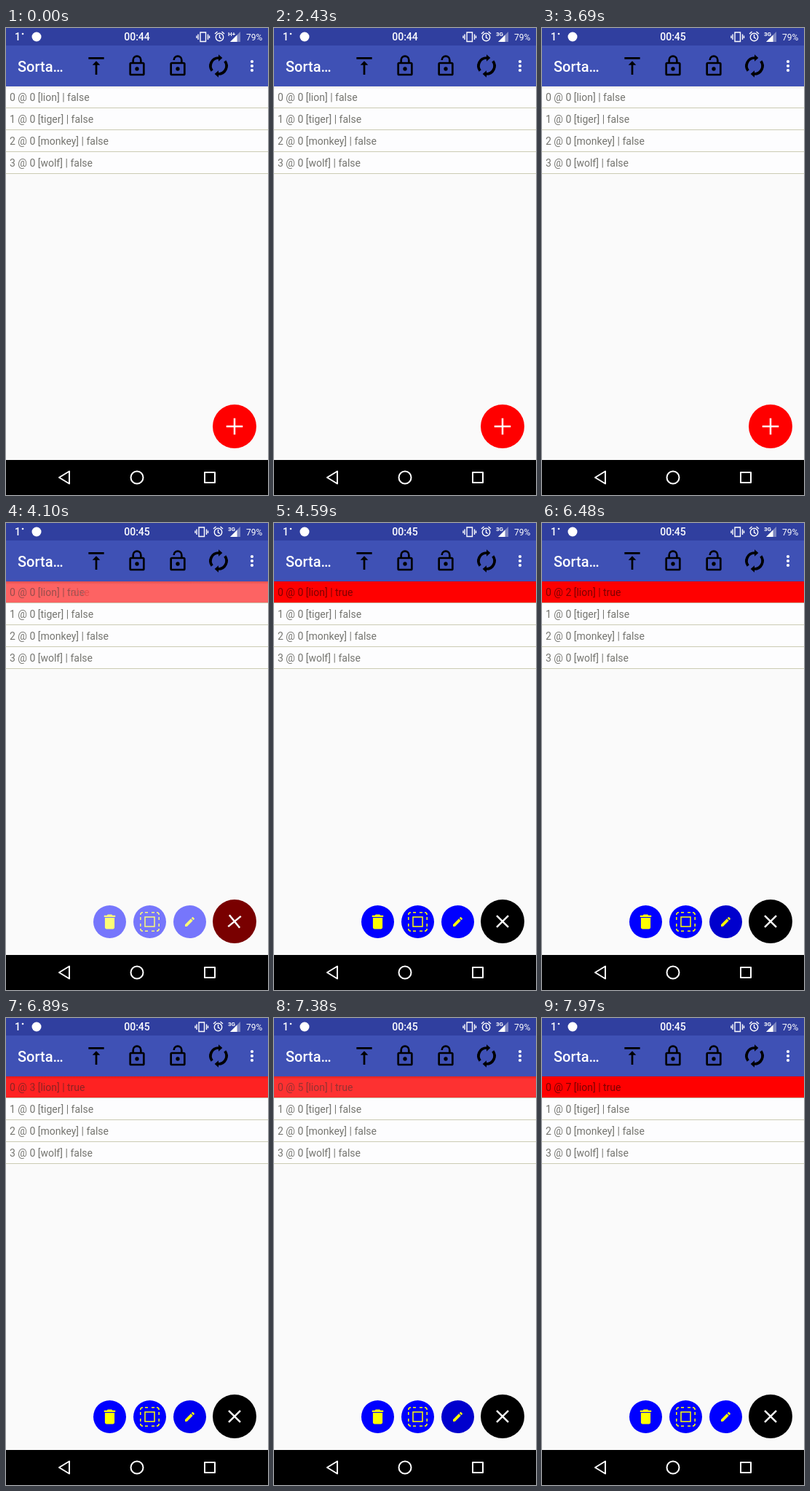
Recreate the animation shown at these times as an HTML page. Size 360x640 px, loop 8000 ms.

```html
<!DOCTYPE html>
<html lang="en">
<head>
<meta charset="utf-8">
<title>Sortable list</title>
<style>
  html, body { margin: 0; width: 100%; height: 100%; overflow: hidden; background: #fafafa; }
  svg { display: block; width: 360px; height: 640px; }
  text { font-family: Roboto, "Noto Sans", sans-serif; font-size: 14px; }
  .row { fill: #757570; }
  .status { fill: #fff; }
  .bold { font-weight: 500; }
  .line { fill: none; stroke-width: 2; }
  .nav { stroke: #fff; }
</style>
</head>
<body>
<svg viewBox="0 0 360 640">
  <defs>
    <linearGradient id="shade" x2="0" y2="1">
      <stop stop-opacity=".2"/><stop offset="1" stop-opacity="0"/>
    </linearGradient>
    <g id="lock">
      <rect class="line" x="5" y="9" width="14" height="12" rx="1" stroke="#000"/>
      <circle cx="12" cy="15" r="2"/>
    </g>
    <g id="half">
      <path d="M12 3.750a8.250 8.250 0 0 0-6.600 13.200" fill="none" stroke="#000" stroke-width="2.800"/>
      <path d="M12 .250l4 3.500-4 3.500z"/>
    </g>
    <path id="edge" d="M-12.700 -9.500a3.200 3.200 0 0 1 3.200 -3.200M-6.500 -12.700h4M2.500 -12.700h4"/>
  </defs>

  <rect width="360" height="640" fill="#fafafa"/>

  <g id="list"></g>
  <rect y="80" width="360" height="4" fill="url(#shade)"/>
  <g id="before"><rect y="80" width="360" height="29"/><text x="5" y="100"></text></g>
  <g id="after"><rect y="80" width="360" height="29"/><text x="5" y="100"></text></g>
  <rect y="80" width="360" height="4" fill="url(#shade)" opacity=".4"/>

  <!-- status bar -->
  <rect width="360" height="24" fill="#303f9f"/>
  <g class="status">
    <text class="bold" x="12" y="17">1</text>
    <circle cx="23" cy="8" r="1.300"/>
    <circle cx="42" cy="12" r="6.500"/>
    <text id="clock" class="bold" x="180" y="17" text-anchor="middle">00:44</text>
    <g id="alerts" fill="none" stroke="#fff" stroke-width="1.400">
      <path d="M267 6h7.500v12.500h-7.500zM264 8.500v7.500M277.500 8.500v7.500M262 10.500v3.500M279.500 10.500v3.500"/>
      <path d="M293.500 9v4l2.500 1.500M287 8l3.500-3M300 8l-3.500-3"/>
      <circle cx="293.500" cy="12.500" r="5.200"/>
    </g>
    <path d="M308 19L322 5V19z" fill="#7d86c0"/>
    <path d="M308 19L317.500 9.500V19z"/>
    <text id="net" x="305" y="11" style="font-size:8px;font-weight:700">H+</text>
    <text x="330" y="17" style="font-size:12px">79%</text>
  </g>

  <!-- toolbar -->
  <rect y="24" width="360" height="56" fill="#3f51b5"/>
  <text class="bold" x="16" y="60" fill="#fff" style="font-size:20px">Sorta…</text>
  <g transform="translate(108 36) scale(1.3333)">
    <path d="M8 11h3v10h2V11h3l-4-4zM4 3v2h16V3z"/>
    <g transform="translate(42)"><use href="#lock"/><path class="line" stroke="#000" d="M8 9V6a4 4 0 0 1 8 0v3"/></g>
    <g transform="translate(84)"><use href="#lock"/><path class="line" stroke="#000" d="M8 6a4 4 0 0 1 8 0v3"/></g>
    <g transform="translate(126)"><use href="#half"/><use href="#half" transform="rotate(180 12 12)"/></g>
  </g>
  <g fill="#fff">
    <circle cx="338" cy="46" r="2.100"/><circle cx="338" cy="52" r="2.100"/><circle cx="338" cy="58" r="2.100"/>
  </g>

  <!-- action buttons -->
  <g id="actions" fill="#ff0">
    <g transform="translate(142.500 546.500)">
      <circle r="22.500" fill="#00f"/>
      <path transform="scale(1.1) translate(-12 -12)" d="M6 19c0 1.100.900 2 2 2h8c1.100 0 2-.900 2-2V7H6zM19 4h-3.500l-1-1h-5l-1 1H5v2h14z"/>
    </g>
    <g transform="translate(197.500 546.500)">
      <circle r="22.500" fill="#00f"/>
      <g fill="none" stroke="#ff0" stroke-width="1.500">
        <rect x="-6.500" y="-6.500" width="13" height="13"/>
        <use href="#edge"/><use href="#edge" transform="rotate(90)"/>
        <use href="#edge" transform="rotate(180)"/><use href="#edge" transform="rotate(270)"/>
      </g>
    </g>
    <g transform="translate(252.500 546.500)">
      <circle id="pen" r="22.500"/>
      <path transform="scale(.72) translate(-12 -12)" d="M3 17.250V21h3.750L17.810 9.940l-3.750-3.750zM20.710 7.040c.390-.390.390-1.020 0-1.410l-2.340-2.340c-.390-.390-1.020-.390-1.410 0l-1.830 1.830 3.750 3.750z"/>
    </g>
  </g>
  <g transform="translate(314 546)">
    <circle id="fab" r="30"/>
    <path id="cross" d="M-11.300 0h22.600M0 -11.300v22.600" stroke="#fff" stroke-width="2.500"/>
  </g>

  <!-- navigation bar -->
  <rect y="592" width="360" height="48"/>
  <g class="line nav" stroke-linejoin="round">
    <path d="M73 616L87 607.500V624.500z"/>
    <circle cx="180" cy="616" r="8.500"/>
    <rect x="273" y="609" width="14" height="14"/>
  </g>
</svg>
<script>
const LOOP = 8000, FADE = 250, SELECT = 3950;
const OPEN = 3860, OPEN_TIME = 460;
// Each tap on the pen: finger down, finger up.
const taps = [[5270, 5420], [5940, 6080], [6410, 6490], [6750, 6850],
              [7040, 7200], [7320, 7460], [7600, 7720]];
const changes = [SELECT, ...taps.map(tap => tap[1])];

const $ = id => document.getElementById(id);
const clamp = x => Math.max(0, Math.min(1, x));
const ramp = (t, start, length) => clamp((t - start) / length);

$('list').innerHTML = ['lion', 'tiger', 'monkey', 'wolf'].map((name, i) => {
  const y = 80 + i * 30;
  const label = i ? `<text class="row" x="5" y="${y + 20}">${i} @ 0 [${name}] | false</text>` : '';
  return `<rect y="${y}" width="360" height="29" fill="${i ? '#fdfdfe' : '#fafafa'}"/>` +
    `<rect y="${y + 29}" width="360" height="1" fill="#cbcbb4"/>${label}`;
}).join('');

// State 0 is unselected; later states are selected with a growing count.
function paintRow(id, state, alpha) {
  const [box, label] = $(id).children;
  const on = state > 0;
  box.setAttribute('fill', on ? '#f00' : '#fdfdfe');
  label.setAttribute('fill', on ? '#7c0000' : '#757570');
  label.textContent = `0 @ ${Math.max(0, state - 1)} [lion] | ${on}`;
  $(id).setAttribute('opacity', alpha);
}

function overshoot(p) {
  const q = p - 1;
  return q * q * (3 * q + 2) + 1;
}

function render(t) {
  $('clock').textContent = t < 3600 ? '00:44' : '00:45';
  $('net').textContent = t < 720 ? 'H+' : t < 2430 ? 'H' : '3G';
  $('alerts').setAttribute('transform', `translate(${t < 2430 ? 0 : -2})`);

  const state = changes.filter(c => c <= t).length;
  const mix = state ? ramp(t, changes[state - 1], FADE) : 1;
  paintRow('before', Math.max(0, state - 1), 1 - mix);
  paintRow('after', state, mix);

  const open = ramp(t, OPEN, OPEN_TIME);
  $('actions').setAttribute('opacity', open);
  $('fab').setAttribute('fill', `rgb(${Math.round(255 * (1 - open))},0,0)`);
  $('cross').setAttribute('transform', `rotate(${45 * overshoot(open)})`);

  const press = Math.max(...taps.map(([down, up]) => ramp(t, down, 60) - ramp(t, up, 60)));
  $('pen').setAttribute('fill', `rgb(0,0,${Math.round(255 - 50 * press)})`);
}

const begin = performance.now();
function tick() {
  render((performance.now() - begin) % LOOP);
  requestAnimationFrame(tick);
}
tick();
</script>
</body>
</html>
```
